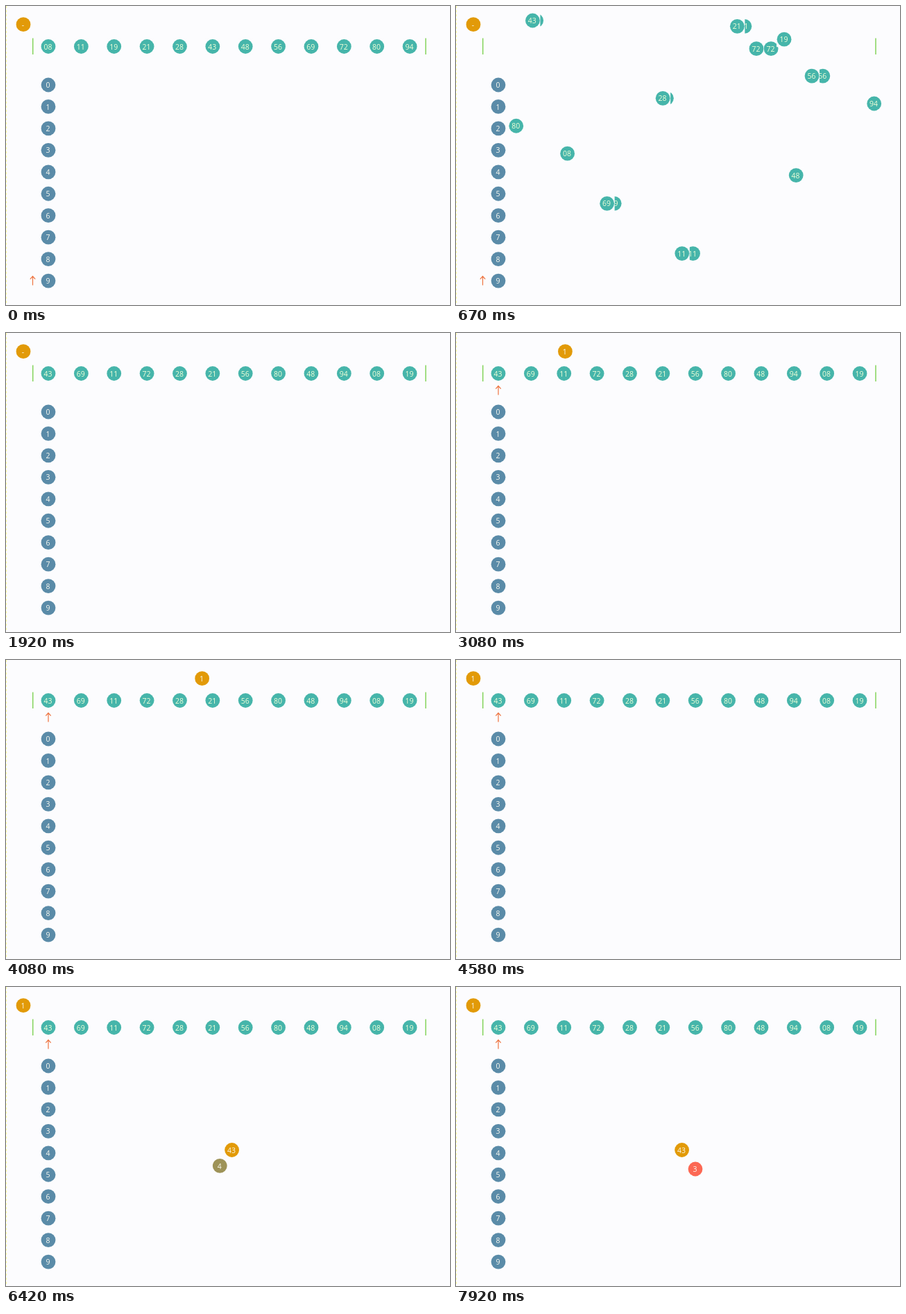
These frames come from a looping animation (640x432 px, 8 s). An HTML page:

```html
<!DOCTYPE html>
<html lang="en">
<head>
<meta charset="utf-8">
<title>Radix sort</title>
<style>
html, body { margin: 0; width: 100%; height: 100%; overflow: hidden; background: #fcfcfe; }
svg { display: block; width: 640px; height: 432px; }
text { font: 10.5px "Open Sans", "Noto Sans", sans-serif; text-anchor: middle; }
</style>
</head>
<body>
<svg id="stage" viewBox="0 0 640 432">
  <path d="M.5 0V432" stroke="#ffff9c" stroke-dasharray="3 3"/>
  <path d="M38.7 46.5V70M605 46.5V70" stroke="#84d45c" stroke-width="1.5"/>
  <path id="arrow" d="M0 13.5V.5M-3.7 4.6 0 .5 3.7 4.6" fill="none" stroke="#ee7440" stroke-width="1.2"/>
</svg>
<script>
const stage = document.getElementById('stage');
const arrow = document.getElementById('arrow');
const NS = 'http://www.w3.org/2000/svg';
const FPS = 12, LOOP = 8000;
const TEAL = [70, 181, 170], SLATE = [90, 139, 168], ORANGE = [226, 154, 8], RED = [252, 104, 84];
const ROW_Y = 58.5, MID = [325.6, 235.5];
const slotX = i => 61 + 47.37 * i;

const clamp = v => Math.min(1, Math.max(0, v));
const lerp = (a, b, p) => a + (b - a) * p;
const mix = (a, b, p) => a.map((v, i) => lerp(v, b[i], p));
const ramp = (n, from, steps) => clamp((n - from) / steps);
const ease = (n, from) => (1 - Math.cos(Math.PI * ramp(n, from, 9.6))) / 2;
const rgb = c => `rgb(${c.map(Math.round)})`;

function add(parent, tag, attrs) {
  const el = document.createElementNS(NS, tag);
  for (const k in attrs) el.setAttribute(k, attrs[k]);
  return parent.appendChild(el);
}

function ball(label, color, x, y, boxed) {
  const g = add(stage, 'g', {});
  if (boxed) add(g, 'rect', { x: -11, y: -11, width: 22, height: 22, fill: '#fcfcfe' });
  const disc = add(g, 'circle', { r: 10.4, fill: rgb(color) });
  const text = add(g, 'text', { x: -.6, y: 4.1, fill: boxed ? '#f0ffd8' : '#fafaf0' });
  text.textContent = label;
  const b = {
    move(px, py) { g.setAttribute('transform', `translate(${px.toFixed(2)} ${py.toFixed(2)})`); },
    paint(c) { disc.setAttribute('fill', rgb(c)); },
    show(on) { g.setAttribute('visibility', on ? 'visible' : 'hidden'); },
    label(s) { if (text.textContent !== s) text.textContent = s; }
  };
  b.move(x, y);
  return b;
}

for (let i = 0; i < 10; i++) ball(String(i), SLATE, 61, 114 + 31.45 * i);

// label, sorted slot, shuffled slot, scatter x, scatter y; in stacking order
const row = [
  ['28', 4, 4, 309.5, 142], ['43', 5, 0, 122, 16.7], ['69', 8, 1, 242, 311.5],
  ['11', 1, 2, 363, 392], ['72', 9, 3, 483, 62], ['21', 3, 5, 429.5, 26],
  ['56', 7, 6, 550, 106], ['80', 10, 7, 51.5, 186.5], ['48', 6, 8, 496, 266],
  ['94', 11, 9, 616, 150.5], ['08', 0, 10, 117.5, 231], ['19', 2, 11, 460.5, 47]
].map(([label, from, to, sx, sy]) => ({
  from: label === '43' ? 5 : from, to, sx, sy,
  main: ball(label, TEAL, 0, 0, true),
  twin: to < 7 ? ball(label, TEAL, 0, 0, true) : null
}));

const tens = ball('4', ORANGE, 0, 0);
const ones = ball('3', ORANGE, 0, 0);
const pick = ball('43', ORANGE, 0, 0);
const pass = ball('-', ORANGE, 25, 26.7);

function drawRow(n) {
  const p = ease(n, 6);
  for (const b of row) {
    const x = n < 6 ? slotX(b.from) : lerp(b.sx, slotX(b.to), p);
    const y = n < 6 ? ROW_Y : lerp(b.sy, ROW_Y, p);
    b.main.move(x, y);
    if (!b.twin) continue;
    b.twin.show(n >= 6 && n < 15 && b.to < (n < 11 ? 7 : 5));
    b.twin.move(x - 5.27 * (b.to % 4 + 1), y);
  }
}

function drawPass(n) {
  let x = lerp(25, 64, ease(n, 25.4));
  if (n > 35) x = lerp(64, 325.6, ramp(n, 35, 5.6));
  if (n > 48) x = lerp(325.6, 25, ramp(n, 48, 7));
  pass.move(x, 26.7);
  pass.label(n < 26 ? '-' : '1');
}

function drawDigits(n) {
  const p = ramp(n, 65, 6);
  pick.show(n >= 64);
  pick.move(lerp(61, MID[0], p), lerp(ROW_Y, MID[1], p));

  const back = ramp(n, 87, 8);
  const out = ramp(n, 72, 6) * (1 - back);
  tens.show(n >= 73 && n < 95);
  tens.move(lerp(MID[0], 304.8, out), lerp(MID[1], 263, out));
  tens.paint(mix(ORANGE, SLATE, ramp(n, 72, 10) * (1 - back)));

  const q = ramp(n, 78, 8);
  ones.show(n >= 79);
  ones.move(lerp(MID[0], 345, q), lerp(MID[1], 263, q));
  ones.paint(mix(mix(ORANGE, SLATE, q), RED, back));
}

function draw(n) {
  const p = ease(n, 15.4);
  arrow.setAttribute('transform', `translate(${lerp(38.5, 61, p)} ${lerp(390, 76, p)})`);
  drawRow(n);
  drawPass(n);
  drawDigits(n);
}

const start = performance.now();
function tick(now) {
  const t = Math.max(0, now - start) % LOOP;
  draw(Math.floor((t + 4) * FPS / 1000) % (LOOP * FPS / 1000));
  requestAnimationFrame(tick);
}
draw(0);
requestAnimationFrame(tick);
</script>
</body>
</html>
```
